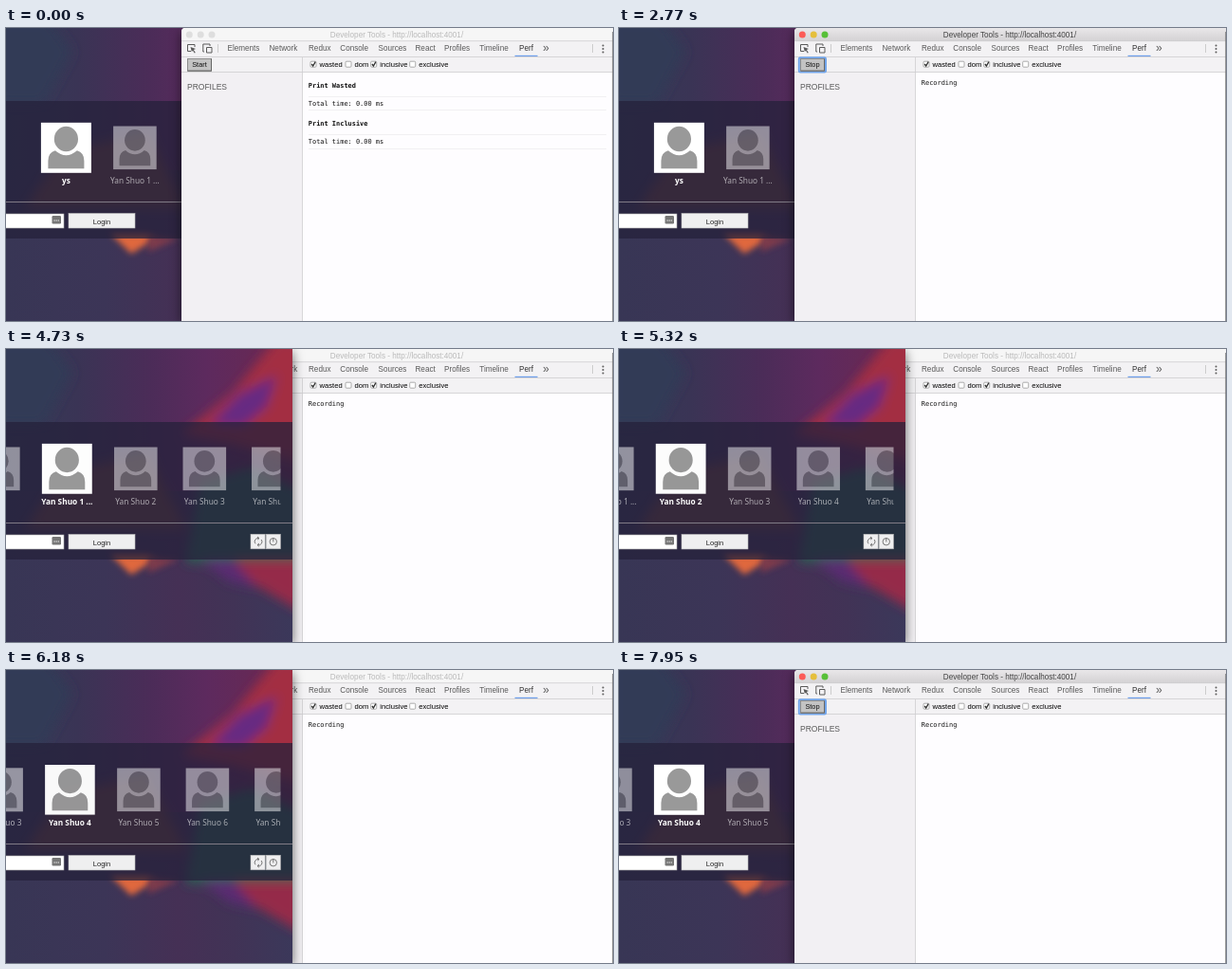
An HTML page that plays this animation: 640x309 px, repeating every 8000 ms.

```html
<!DOCTYPE html>
<html lang="en">
<head>
<meta charset="utf-8">
<title>Login list profiling</title>
<style>
  html, body { margin: 0; width: 100%; height: 100%; overflow: hidden; background: #2f3046; }
  svg { display: block; width: 100vw; height: 100vh; }
  text { font-family: "Liberation Sans", Arial, sans-serif; white-space: pre; }
  .mono { font: 6.95px "DejaVu Sans Mono", monospace; fill: #111; }
  .bold { font-weight: bold; }
  .user { font: 8.3px "Noto Sans", sans-serif; fill: #fff; text-anchor: middle; }
  .tab { font-size: 8.15px; fill: #5a5a5a; }
  .option { font-size: 7.6px; fill: #000; }
  .mid { text-anchor: middle; }
  .line { fill: none; stroke: #5a5a5a; }
  .shadow { filter: drop-shadow(0 3px 6px rgba(0, 0, 0, .6)); }
</style>
</head>
<body>
<svg viewBox="0 0 640 309" preserveAspectRatio="none">
  <defs>
    <linearGradient id="base">
      <stop offset="0" stop-color="#343a56"/><stop offset=".25" stop-color="#3a3455"/>
      <stop offset=".5" stop-color="#4b2c58"/><stop offset=".7" stop-color="#5d2a5e"/><stop offset="1" stop-color="#6c2850"/>
    </linearGradient>
    <linearGradient id="ground">
      <stop offset="0" stop-color="#383655"/><stop offset=".35" stop-color="#3c3557"/>
      <stop offset=".6" stop-color="#453055"/><stop offset=".8" stop-color="#413356"/><stop offset="1" stop-color="#3b385a"/>
    </linearGradient>
    <linearGradient id="titlebar" x2="0" y2="1">
      <stop offset="0" stop-color="#e9e7e9"/><stop offset="1" stop-color="#d3d1d3"/>
    </linearGradient>
    <filter id="soft" x="-50%" y="-50%" width="200%" height="200%"><feGaussianBlur stdDeviation="6"/></filter>
    <filter id="glow" x="-50%" y="-50%" width="200%" height="200%"><feGaussianBlur stdDeviation="3"/></filter>
    <clipPath id="page"><rect width="302" height="309"/></clipPath>
    <clipPath id="listArea"><rect y="90" width="289.5" height="85"/></clipPath>
    <g id="avatar">
      <rect x="-26.5" y="-26.5" width="53" height="53" fill="#fff"/>
      <g fill="#999">
        <ellipse cy="-9.3" rx="12.6" ry="13.2"/>
        <path d="M-19 22V14Q-19 5 -11.5 3Q0 13 11.5 3Q19 5 19 14V22Z"/>
      </g>
    </g>
  </defs>

  <g id="scene">
    <g id="browser">
      <rect class="shadow" width="302" height="309" fill="#3b3050"/>
      <g clip-path="url(#page)">
        <rect width="302" height="160" fill="url(#base)"/>
        <rect y="150" width="302" height="159" fill="url(#ground)"/>
        <g filter="url(#soft)">
          <path d="M-10 -10H45L70 25L40 80H-10Z" fill="#323b56"/>
          <path d="M185 90L240 45L285 -10H312V120L240 100Z" fill="#a32d42"/>
          <path d="M215 80L245 48L285 28L275 60L250 82Z" fill="#662c82"/>
          <path d="M20 190L60 130L150 110L190 190Z" fill="#6a403c"/>
          <path d="M190 225L205 140L260 125L312 150V225Z" fill="#2c6252"/>
          <path d="M225 222H312V278L265 250Z" fill="#952b48"/>
          <path d="M205 222H240L265 252L235 245Z" fill="#5a2c72"/>
        </g>
        <path d="M110 217H150L158 222L132 238Z" fill="#e0683c" filter="url(#glow)"/>
        <path d="M150 218L182 222L150 236Z" fill="#7d3a4c" filter="url(#glow)"/>
        <rect y="77" width="302" height="145" fill="#25213a" fill-opacity=".74"/>
        <g id="users" clip-path="url(#listArea)"></g>
        <path d="M0 183.5H302" stroke="#807b86"/>
        <rect x="-3" y="196" width="64" height="15" fill="#fff" stroke="#aaa" stroke-width=".6"/>
        <rect x="48.5" y="198" width="9.5" height="8.5" rx="1.2" fill="#777"/>
        <path d="M50.5 203H56" stroke="#fff" stroke-width="1.2" stroke-dasharray="1.2 .9"/>
        <g fill="#efeff0" stroke="#bbb" stroke-width=".6">
          <rect x="66" y="195.5" width="70" height="15.5"/>
          <rect x="258" y="195.3" width="15.2" height="15.5"/>
          <rect x="274.2" y="195.3" width="15.2" height="15.5"/>
        </g>
        <text class="mid" x="101" y="207" font-size="7.5" fill="#222">Login</text>
        <g class="line" stroke-width=".8">
          <path d="M263 205.3A3.6 3.6 0 0 1 266.5 199.5M269.2 201A3.6 3.6 0 0 1 265.4 206.7M265 198L267 199.6L265.2 201M267 205L265 206.6L266.8 208.2"/>
          <circle cx="281.8" cy="203.2" r="3.7"/><path d="M281.8 199.3V203.4"/>
        </g>
      </g>
    </g>

    <g id="devtools">
      <path class="shadow" d="M185 309V4Q185 0 189 0H640V309Z" fill="#fefdff"/>
      <path id="bar" d="M185 14V4Q185 0 189 0H640V14Z"/>
      <g id="lights"><circle cx="193.3" cy="7" r="3.5"/><circle cx="205.2" cy="7" r="3.5"/><circle cx="217" cy="7" r="3.5"/></g>
      <text id="title" class="mid" x="412" y="10" font-size="8.15">Developer Tools - http://localhost:4001/</text>
      <rect x="185" y="14" width="455" height="32.5" fill="#f3f2f4"/>
      <rect x="185" y="46" width="127" height="263" fill="#f2f0f3"/>
      <path d="M185 13.7H640M185 30.5H640M185 46.5H640M312.5 31V309" stroke="#cfcdd0" stroke-width=".8"/>
      <g class="line">
        <path d="M195 24.5H191.5V17.5H199V20"/><path d="M194.5 20L200 22L197.8 23L199.8 26L198.7 26.5L197 23.8L195.8 25Z" fill="#5a5a5a" stroke="none"/>
        <path d="M209 25H207.8V17H215V19M211.5 20.5H217V26H211.5Z"/>
        <path d="M223.5 17V26M618.5 17V26" style="stroke:#ccc"/>
      </g>
      <g id="tabs"></g>
      <rect x="536.5" y="28.8" width="24" height="1.2" fill="#6d9eea"/>
      <g fill="#5a5a5a"><circle cx="629.5" cy="18.5" r="1"/><circle cx="629.5" cy="22" r="1"/><circle cx="629.5" cy="25.5" r="1"/></g>
      <rect id="ring" x="189.8" y="31.3" width="28.2" height="15.2" rx="1.5" fill="none" stroke="#72a5ea" stroke-width="2"/>
      <rect x="191.5" y="32.5" width="25" height="12.7" fill="#c3c3c3" stroke="#8b8b8b"/>
      <path d="M191.5 45.2H216.5V32.5" fill="none" stroke="#666"/>
      <text id="button" class="mid" x="204" y="41.4" font-size="7.4" fill="#111"></text>
      <text x="191" y="64.5" font-size="8.5" fill="#5a5a5a">PROFILES</text>
      <g id="options"></g>
      <g id="results">
        <path d="M319 72.5H633M319 86.5H633M319 112.5H633M319 127.5H633" stroke="#f1f0f2"/>
        <text class="mono bold" x="318.8" y="63">Print Wasted</text>
        <text class="mono" x="318.8" y="82.3">Total time: 0.00 ms</text>
        <text class="mono bold" x="318.8" y="103.3">Print Inclusive</text>
        <text class="mono" x="318.8" y="122.3">Total time: 0.00 ms</text>
      </g>
      <text id="recording" class="mono" x="318.8" y="60.3">Recording</text>
      <path d="M639.6 4V309" stroke="#777" stroke-width=".8"/>
    </g>
  </g>
</svg>

<script>
const LOOP = 8000;
const FOCUS = 850, RECORD = 2250, BROWSER_FRONT = 3330, DEVTOOLS_FRONT = 6950;
const KEYS = [4240, 4890, 5380, 5825];
const PITCH = 72.5, FIRST_X = 63.4;
const names = ["ys", "Yan Shuo 1 ...", ...[2, 3, 4, 5, 6, 7, 8].map(n => "Yan Shuo " + n)];
const $ = id => document.getElementById(id);
const show = (id, on) => $(id).setAttribute("visibility", on ? "visible" : "hidden");

const tabs = { Elements: 233.5, Network: 277.5, Redux: 319, Console: 352.3, Sources: 392.5,
  React: 431.5, Profiles: 462, Timeline: 499.3, Perf: 541 };
$("tabs").innerHTML = Object.entries(tabs).map(([name, x]) =>
  `<text class="tab" x="${x}" y="24.3"${name === "Perf" ? ' style="fill:#333"' : ""}>${name}</text>`).join("") +
  `<text class="tab" x="566" y="25" style="font-size:12px">»</text>`;

const options = [["wasted", 321, 1], ["dom", 358, 0], ["inclusive", 384.7, 1], ["exclusive", 425.7, 0]];
$("options").innerHTML = options.map(([name, x, checked]) => `
  <rect x="${x}" y="35.2" width="6" height="6" rx="1" fill="#fff" stroke="#999" stroke-width=".8"/>
  ${checked ? `<path d="M${x + 1.2} 38L${x + 2.7} 40L${x + 5.2} 35.7" fill="none" stroke="#333" stroke-width="1.3"/>` : ""}
  <text class="option" x="${x + 9.6}" y="41.4">${name}</text>`).join("");

$("users").innerHTML = names.map(name =>
  `<g><use href="#avatar"/><text class="user" y="164">${name}</text></g>`).join("");
const users = [...$("users").children];

// Critically damped spring from 0 to 1.
function spring(ms) {
  const u = Math.max(0, ms) * 0.013;
  return 1 - Math.exp(-u) * (1 + u);
}

function drawUsers(t) {
  const steps = [1, ...KEYS.map(key => spring(t - key))];
  const position = steps.reduce((a, b) => a + b) - 1;
  users.forEach((user, i) => {
    const picked = (steps[i] || 0) - (steps[i + 1] || 0);
    const [image, label] = user.children;
    user.setAttribute("transform", `translate(${FIRST_X + PITCH * (i - position)} 0)`);
    image.setAttribute("transform", `translate(0 126.3) scale(${0.86 + 0.14 * picked})`);
    image.setAttribute("opacity", 0.48 + 0.52 * picked);
    label.setAttribute("opacity", 0.6 + 0.4 * picked);
    label.setAttribute("font-weight", picked > 0.5 ? 600 : 400);
    label.style.fontWeight = picked > 0.5 ? 600 : 400;
  });
}

function drawDevtools(t) {
  const browserFront = t >= BROWSER_FRONT && t < DEVTOOLS_FRONT;
  const focused = t >= FOCUS && !browserFront;
  const recording = t >= RECORD;
  const front = $(browserFront ? "browser" : "devtools");
  if ($("scene").lastElementChild !== front) $("scene").append(front);
  $("bar").setAttribute("fill", focused ? "url(#titlebar)" : "#f6f6f6");
  $("title").setAttribute("fill", focused ? "#444" : "#bababa");
  ["#fc5b57", "#e5bf3c", "#57c038"].forEach((color, i) =>
    $("lights").children[i].setAttribute("fill", focused ? color : "#dedede"));
  $("button").textContent = recording ? "Stop" : "Start";
  show("ring", recording);
  show("recording", recording);
  show("results", !recording);
}

function frame() {
  const t = performance.now() % LOOP;
  drawUsers(t);
  drawDevtools(t);
  requestAnimationFrame(frame);
}
frame();
</script>
</body>
</html>
```
